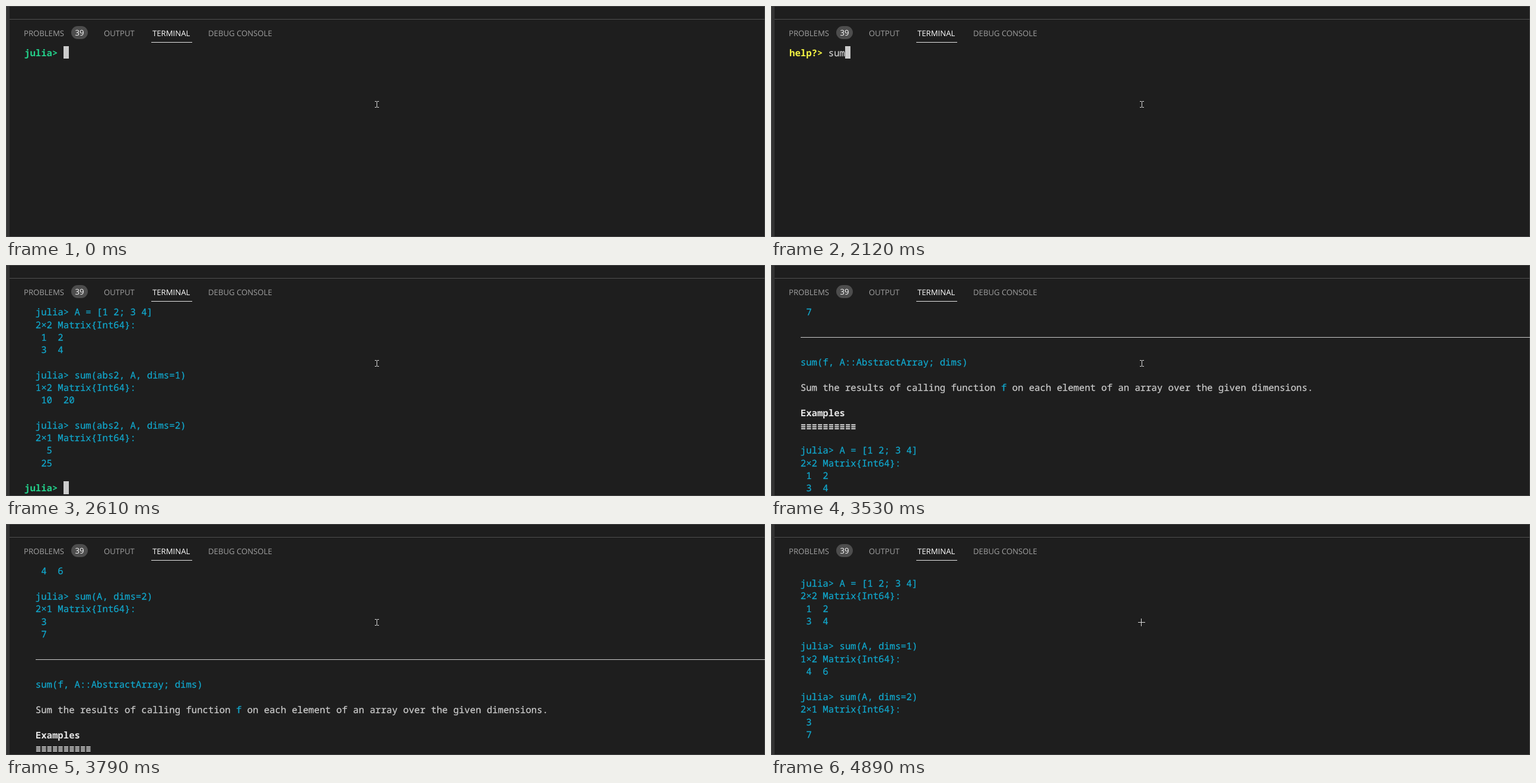
Write an HTML page that moves like this. It is 1280 by 391 pixels and loops after 4910 ms.

```html
<!DOCTYPE html>
<html lang="en">
<head>
<meta charset="utf-8">
<title>Terminal help</title>
<style>
  :root { --row: 21.3px; --top: 1.2px; --cyan: #11a8cd; --light: #ccc; --loop: 4910ms step-end infinite; }
  html, body { margin: 0; width: 100%; height: 100%; overflow: hidden; background: #1e1e1e; }
  body { position: relative; text-rendering: geometricPrecision; }

  /* panel chrome */
  .frame, .strip, .divider, .tab, .badge, .underline, .terminal, .pointer, .rule { position: absolute; }
  .frame { inset: 0; border: 1px solid #484848; }
  .strip { left: 1px; top: 1px; bottom: 1px; width: 5px; background: #333; }
  .divider { left: 6px; right: 0; top: 22px; height: 1px; background: #505050; }
  .tab, .badge { font: 13.15px/22px "Open Sans", sans-serif; top: 35px; color: #a0a0a0; white-space: nowrap; }
  .tab.active { color: #fff; }
  .badge { left: 110px; top: 34px; width: 28px; border-radius: 11px; background: #4d4d4d; color: #fff; text-align: center; }
  .underline { left: 245px; top: 61px; width: 69px; height: 1px; background: #e7e7e7; }

  /* terminal */
  .terminal { left: 0; top: 68px; width: 1280px; height: 321px; overflow: hidden; }
  pre { position: absolute; left: 31px; top: var(--top); margin: 0; color: var(--cyan);
        font: 15.67px/var(--row) "Noto Sans Mono", monospace; -webkit-text-stroke: .25px currentColor; }
  .plain { color: var(--light); }
  b { color: #e5e5e5; -webkit-text-stroke: 0; }
  .julia { color: #23d18b; }
  .help { color: #f5f543; }
  .rule { left: 18.8px; width: 1240px; height: 1px; margin-top: 10px; background: var(--light); }
  .bars { position: relative; top: 2px; }
  .cursor, .typed { display: inline-block; height: var(--row); vertical-align: top; }
  .cursor { position: relative; top: -1px; width: 1ch; background: var(--light); }
  .typed { width: 0; overflow: hidden; color: var(--light); animation: type var(--loop); }
  .prompt { animation: prompt var(--loop); }
  .prompt .julia { position: absolute; animation: julia var(--loop); }
  .prompt .help { opacity: 0; animation: help var(--loop); }
  .output { opacity: 0; animation: output var(--loop), scroll var(--loop); }

  .pointer { left: 618px; top: 159px; fill: none; stroke: #ddd; }
  .beam { animation: beam var(--loop); }
  .cross { opacity: 0; animation: cross var(--loop); }

  @keyframes julia { 0% { opacity: 1 } 20.367%, 100% { opacity: 0 } }
  @keyframes help { 0% { opacity: 0 } 20.367%, 100% { opacity: 1 } }
  @keyframes type { 0% { width: 0 } 34.216% { width: 1ch } 37.271% { width: 2ch } 43.177%, 100% { width: 3ch } }
  @keyframes prompt { 0% { opacity: 1 } 50.713%, 100% { opacity: 0 } }
  @keyframes output { 0% { opacity: 0 } 50.713%, 100% { opacity: 1 } }
  /* the number of rows scrolled past the top */
  @keyframes scroll {
    0% { top: calc(var(--top) - 13 * var(--row)) }
    53.157% { top: calc(var(--top) - 24 * var(--row)) }
    71.894% { top: calc(var(--top) - 13 * var(--row)) }
    74.338% { top: calc(var(--top) - 10 * var(--row)) }
    77.189% { top: calc(var(--top) - 8 * var(--row)) }
    85.947% { top: calc(var(--top) - 2 * var(--row)) }
    88.391%, 100% { top: var(--top) }
  }
  @keyframes beam { 0% { opacity: 1 } 99.593%, 100% { opacity: 0 } }
  @keyframes cross { 0% { opacity: 0 } 99.593%, 100% { opacity: 1 } }
</style>
</head>
<body>
<div class="frame"></div>
<div class="strip"></div>
<div class="divider"></div>

<span class="tab" style="left:30px">PROBLEMS</span>
<span class="badge">39</span>
<span class="tab" style="left:165px">OUTPUT</span>
<span class="tab active" style="left:247px">TERMINAL</span>
<span class="tab" style="left:341px">DEBUG CONSOLE</span>
<div class="underline"></div>

<div class="terminal">
<pre class="prompt"><b class="julia">julia&gt;</b><b class="help">help?&gt;</b> <span class="typed">sum</span><span class="cursor"></span></pre>
<pre class="output">

  julia&gt; A = [1 2; 3 4]
  2×2 Matrix{Int64}:
   1  2
   3  4

  julia&gt; sum(A, dims=1)
  1×2 Matrix{Int64}:
   4  6

  julia&gt; sum(A, dims=2)
  2×1 Matrix{Int64}:
   3
   7

<i class="rule"></i> 

  sum(f, A::AbstractArray; dims)

  <span class="plain">Sum the results of calling function</span> f <span class="plain">on each element of an array over the given dimensions.</span>

  <b>Examples</b>
  <b class="bars">≡≡≡≡≡≡≡≡≡≡</b>

  julia&gt; A = [1 2; 3 4]
  2×2 Matrix{Int64}:
   1  2
   3  4

  julia&gt; sum(abs2, A, dims=1)
  1×2 Matrix{Int64}:
   10  20

  julia&gt; sum(abs2, A, dims=2)
  2×1 Matrix{Int64}:
    5
   25

<b class="julia">julia&gt;</b> <span class="cursor"></span></pre>
</div>

<svg class="pointer" width="14" height="15">
  <path class="beam" d="M7.5 3V12M4 2.5H7M8 2.5H11M4 12.5H7M8 12.5H11"/>
  <path class="cross" d="M1 7.5H13M6.5 1V14"/>
</svg>
</body>
</html>
```
